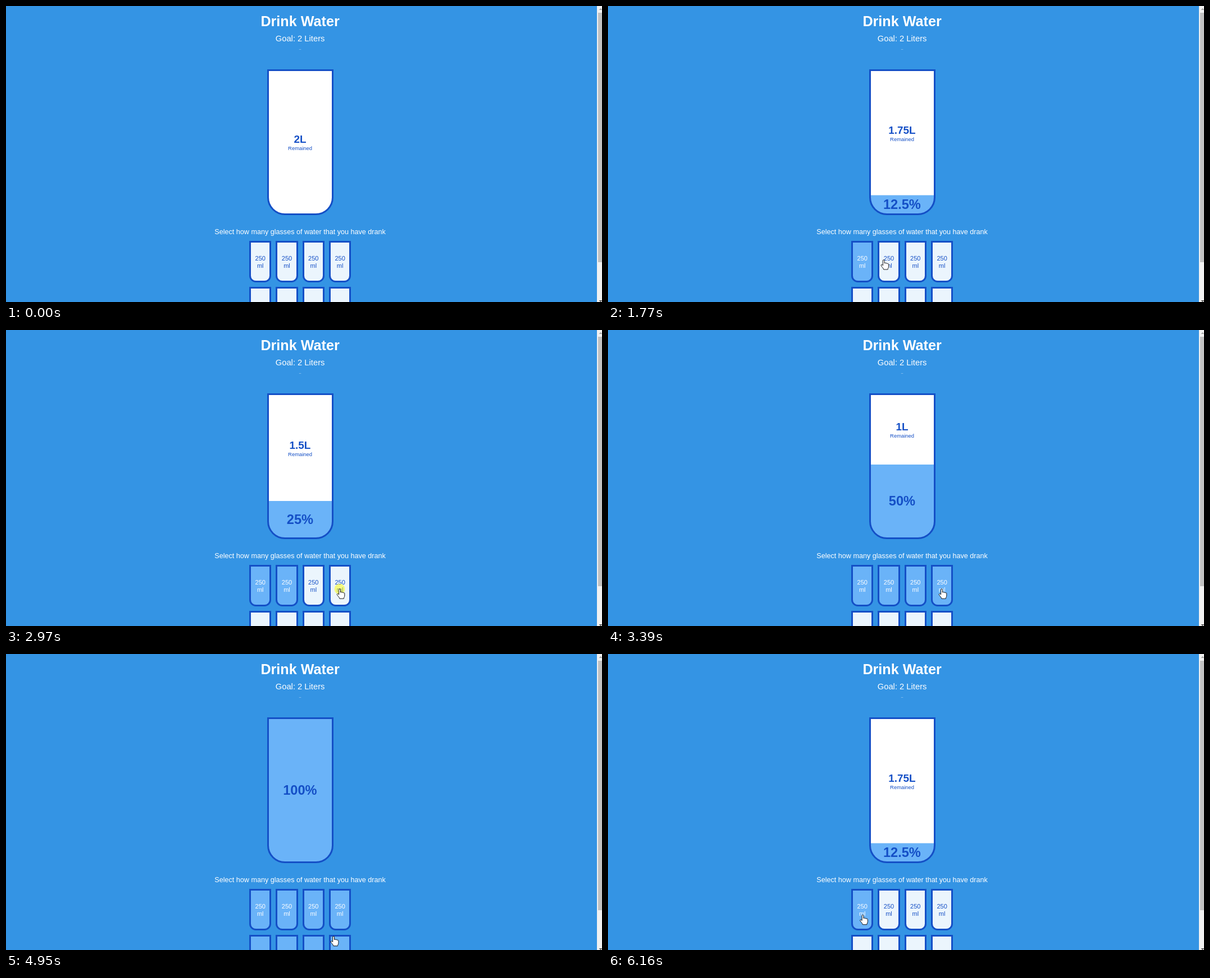
Recreate the animation shown at these times as an HTML page. Size 1061 by 528 pixels, loop 6820 ms.

```html
<!DOCTYPE html>
<html lang="en">
<head>
<meta charset="utf-8">
<title>Drink Water</title>
<style>
  html, body { margin: 0; width: 100%; height: 100%; overflow: hidden; background: #3494e4; }
  svg { display: block; font-family: "Liberation Sans", Arial, sans-serif; text-anchor: middle; }
  .bold { font-weight: bold; }
  .blue { fill: #144fc6; }
  .edge { fill: none; stroke: #144fc6; stroke-width: 3; }
  .cursor { fill: #fff; stroke: #000; stroke-width: .9; stroke-linejoin: round; }
</style>
</head>
<body>
<svg id="stage" width="1061" height="528" viewBox="0 0 1061 528">
  <defs><clipPath id="glass"><path id="inner"/></clipPath></defs>
  <g fill="#fff">
    <text class="bold" x="523.6" y="35.5" font-size="25.2">Drink Water</text>
    <text x="523.6" y="63" font-size="14.75">Goal: 2 Liters</text>
    <text x="523.4" y="77.5" font-size="8">..</text>
    <text x="523.6" y="407.3" font-size="12.6">Select how many glasses of water that you have drank</text>
  </g>
  <g clip-path="url(#glass)">
    <rect x="465" y="113" width="118" height="260" fill="#fff"/>
    <g id="remained" class="blue">
      <text id="liters" class="bold" x="523.5" y="1" font-size="18.9"></text>
      <text x="523.6" y="14" font-size="9.45">Remained</text>
    </g>
    <rect id="water" x="465" width="118" fill="#6ab3f8"/>
    <text id="percent" class="bold blue" x="523.4" font-size="23.6"></text>
  </g>
  <path id="outline" class="edge"/>
  <g id="cups"></g>
  <rect x="1052" width="9" height="528" fill="#f1f1f1"/>
  <rect x="1054" y="12" width="7" height="445" fill="#c1c1c1"/>
  <path d="M1055.5 7l3-3 3 3z" fill="#a3a3a3"/>
  <path d="M1055.5 525h6l-3 3z" fill="#505050"/>
  <circle id="press" r="9.5" fill="#ff0" fill-opacity=".5"/>
  <path id="hand" class="cursor" d="M-1.4 10V1.3a1.4 1.4 0 0 1 2.8 0V6c.6-1 2.6-.8 2.7.4c.7-.9 2.4-.6 2.5.6c.8-.7 2.2-.3 2.2.9V12c0 2-1.5 3-1.5 5.2H-.1C-.6 14.5-3.5 12.5-4.6 10.2c-.6-1.3.8-2.3 1.8-1.5z"/>
  <path id="arrow" class="cursor" d="M0 0V13l3-2.8 2 4.6 2-.9-2-4.5h4z"/>
</svg>
<script>
const LOOP = 6820, FADE = 300, LEAD = 45;
const TOP = 116, BOTTOM = 370, CUP_LEVEL = 32.5;
const EMPTY = [235, 245, 253], FULL = [106, 179, 248];
const BLUE = [20, 79, 198], WHITE = [255, 255, 255];

// press time, time of the change, cups filled afterwards
const clicks = [
  [1290, 1430, 1], [2030, 2160, 2], [2970, 3120, 4], [4280, 4410, 8], [5750, 5880, 1]
];
// time, x, y of the pointer tip
const route = [
  [400, 915, 500], [600, 650, 453], [800, 517, 445], [950, 459, 441], [1020, 452, 449],
  [1090, 452, 450], [1630, 452, 450], [1830, 507, 454], [2400, 507, 454], [2700, 581, 463],
  [2770, 594, 462], [3600, 594, 462], [4080, 598, 508], [4890, 598, 508], [5480, 453.5, 465.5]
];

const $ = id => document.getElementById(id);
const mix = (a, b, p) => a + (b - a) * p;
const tint = (a, b, p) => `rgb(${a.map((v, i) => Math.round(mix(v, b[i], p)))})`;
const show = (el, on) => el.setAttribute("visibility", on ? "visible" : "hidden");
const place = (el, x, y) => el.setAttribute("transform", `translate(${x} ${y})`);

function glassPath(left, top, right, bottom, r) {
  return `M${left} ${top}H${right}V${bottom - r}a${r} ${r} 0 0 1 ${-r} ${r}` +
    `H${left + r}a${r} ${r} 0 0 1 ${-r} ${-r}z`;
}

function add(parent, tag, attrs, text = "") {
  const el = document.createElementNS("http://www.w3.org/2000/svg", tag);
  for (const key in attrs) el.setAttribute(key, attrs[key]);
  el.textContent = text;
  return parent.appendChild(el);
}

$("inner").setAttribute("d", glassPath(467, 115, 581, 371, 29.5));
$("outline").setAttribute("d", glassPath(466.5, 114.5, 581.5, 371.5, 30));

const cups = Array.from({ length: 8 }, (_, i) => {
  const x = 433.1 + 47.3 * (i % 4), y = i < 4 ? 419 : 501;
  const left = Math.round(x), right = Math.round(x + 39.3);
  const d = glassPath(left + 1.5, y + 1.5, right - 1.5, y + 72.5, 10.3);
  const g = add($("cups"), "g", {});
  const body = add(g, "path", { d, class: "edge" });
  const label = add(g, "g", { "font-size": 11.03 });
  add(label, "text", { x: x + 19.6, y: y + 35 }, "250");
  add(label, "text", { x: x + 19.6, y: y + 47.7 }, "ml");
  return { body, label, left, right, y };
});

// CSS "ease": cubic-bezier(.25, .1, .25, 1)
function ease(x) {
  if (x >= 1) return 1;
  const curve = (s, a, b) => 3 * a * s * (1 - s) ** 2 + 3 * b * s * s * (1 - s) + s ** 3;
  let lo = 0, hi = 1;
  for (let i = 0; i < 20; i++) {
    const mid = (lo + hi) / 2;
    if (curve(mid, .25, .25) < x) lo = mid; else hi = mid;
  }
  return curve(lo, .1, 1);
}

function pointerAt(t) {
  const i = route.findIndex(k => k[0] > t);
  if (i < 0) return route.at(-1).slice(1);
  const a = route[i - 1], b = route[i], p = (t - a[0]) / (b[0] - a[0]);
  return [mix(a[1], b[1], p), mix(a[2], b[2], p)];
}

function drawWater(t) {
  const done = clicks.filter(c => t >= c[1]);
  const counts = [0, ...done.map(c => c[2])];
  const now = counts.at(-1), before = counts.at(-2) ?? 0;
  const p = done.length ? ease((t - done.at(-1)[1] + LEAD) / FADE) : 1;
  const height = Math.min(mix(before, now, p) * CUP_LEVEL, BOTTOM - TOP);
  const top = BOTTOM - height;

  $("water").setAttribute("y", top);
  $("water").setAttribute("height", height + 3);
  $("percent").setAttribute("y", (top + BOTTOM) / 2 + 8);
  $("percent").textContent = now * 12.5 + "%";
  show($("percent"), now > 0);

  // a full glass keeps the last amount until it is covered
  $("liters").textContent = 2 - (now === 8 ? before : now) / 4 + "L";
  place($("remained"), 0, (TOP + top) / 2);
  show($("remained"), now < 8 || p < 1);

  cups.forEach((cup, i) => {
    const lit = mix(i < before, i < now, p);
    cup.body.style.fill = tint(EMPTY, FULL, lit);
    cup.label.style.fill = tint(BLUE, WHITE, lit);
  });
}

function drawPointer(t) {
  const visible = t >= route[0][0];
  const [x, y] = visible ? pointerAt(t) : [0, 0];
  const over = cups.some(c => x >= c.left && x <= c.right && y >= c.y && y <= c.y + 74);
  for (const id of ["hand", "arrow", "press"]) place($(id), x, y);
  show($("hand"), visible && over);
  show($("arrow"), visible && !over);
  show($("press"), clicks.some(c => t >= c[0] && t < c[1]));
}

const start = performance.now();
function frame() {
  const t = (performance.now() - start) % LOOP;
  drawWater(t);
  drawPointer(t);
  requestAnimationFrame(frame);
}
frame();
</script>
</body>
</html>
```
